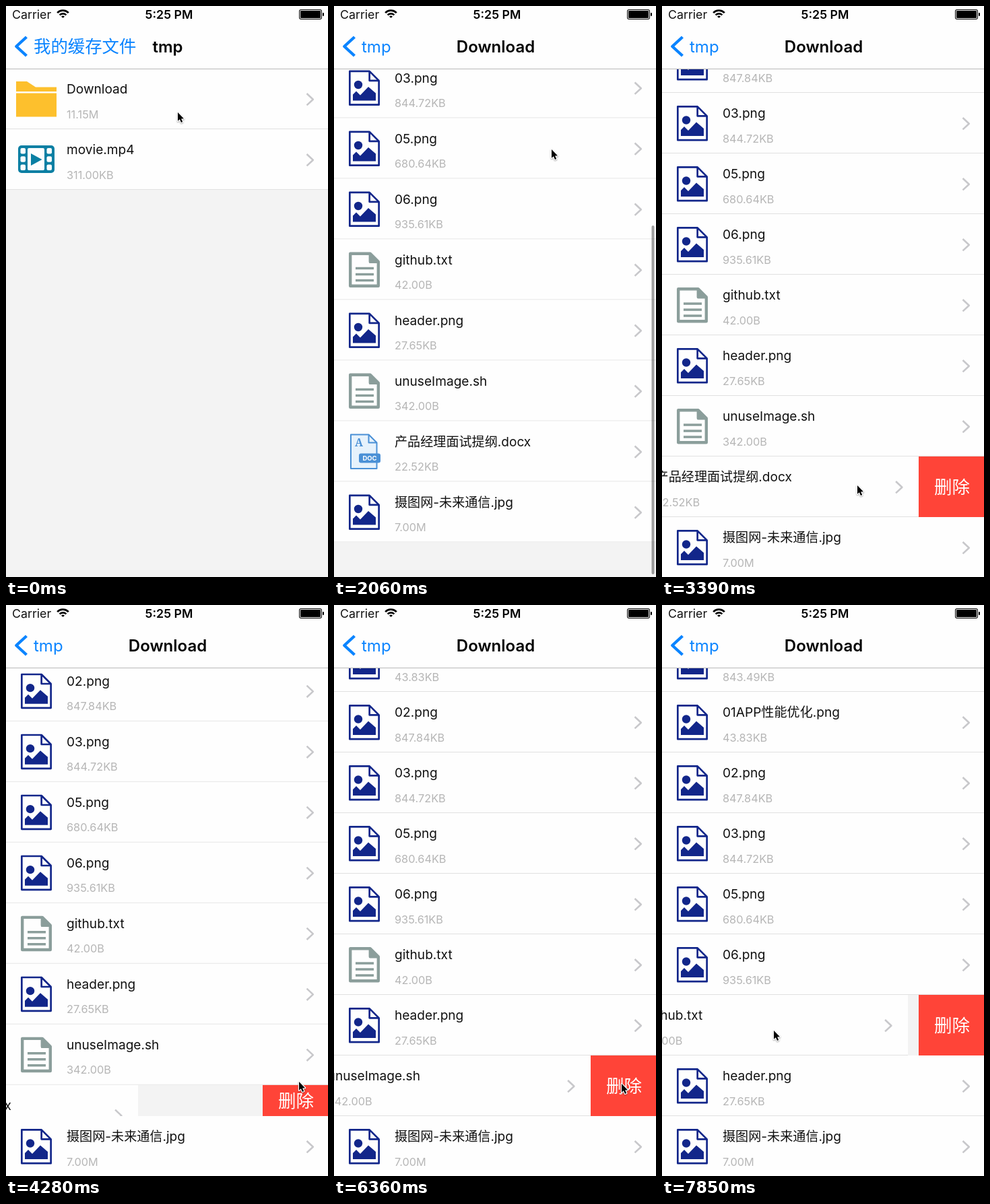
Recreate the animation shown at these times as an HTML page with a canvas. Size 478 by 848 pixels, loop 8000 ms.

```html
<!DOCTYPE html>
<html lang="zh-CN">
<head>
<meta charset="utf-8">
<title>File browser</title>
<style>
html, body { margin: 0; width: 100%; height: 100%; overflow: hidden; background: #f3f3f3; }
canvas { display: block; }
</style>
</head>
<body>
<canvas id="stage" width="478" height="848"></canvas>
<script>
const ctx = document.getElementById('stage').getContext('2d');
const W = 478, H = 848, TOP = 93, ROW = 90, VIEW = 756;
const LOOP = 8000, STEP = 148, LEAD = 16;
const FONT = 'Inter, "Noto Sans CJK SC", "Noto Sans CJK JP", sans-serif';
const BLUE = '#0a84ff', NAVY = '#12268a', PAPER = '#fefefe', GROUND = '#f3f3f3', RED = '#ff4438';
const OPEN = 97, PULL = 113, DRAG = 52.5;

const home = [
  { icon: folder, name: 'Download', size: '11.15M' },
  { icon: movie, name: 'movie.mp4', size: '311.00KB' }
];
// swipe: when the row starts to open; cut: when it is deleted.
const files = [
  { icon: image, name: '01.png', size: '843.49KB' },
  { icon: image, name: '01APP性能优化.png', size: '43.83KB' },
  { icon: image, name: '02.png', size: '847.84KB' },
  { icon: image, name: '03.png', size: '844.72KB' },
  { icon: image, name: '05.png', size: '680.64KB' },
  { icon: image, name: '06.png', size: '935.61KB' },
  { icon: note, name: 'github.txt', size: '42.00B', swipe: 7250 },
  { icon: image, name: 'header.png', size: '27.65KB' },
  { icon: note, name: 'unuseImage.sh', size: '342.00B', swipe: 5680, cut: 6510 },
  { icon: doc, name: '产品经理面试提纲.docx', size: '22.52KB', swipe: 2690, cut: 4129 },
  { icon: image, name: '摄图网-未来通信.jpg', size: '7.00M' }
];

// Where the pointer comes to rest: arrival time and place.
const stops = [
  [0, 255, 158], [600, 258, 147], [1450, 306, 540], [2056, 323, 213], [2648, 406, 693],
  [3260, 290, 712], [3980, 435, 708], [4900, 434, 791], [5680, 420, 716],
  [6120, 312, 716], [6348, 427, 711], [7250, 279, 628], [7828, 166, 632]
];

const clamp = v => Math.min(1, Math.max(0, v));
const ease = v => clamp(v) ** 2 * (3 - 2 * clamp(v));

function pointer(t) {
  let [last, x, y] = stops[0];
  for (const [end, px, py] of stops) {
    const k = ease(1 - (end - t) / Math.min(450, end - last || 1));
    x += (px - x) * k;
    y += (py - y) * k;
    last = end;
  }
  return [x, y];
}

// Drag past the end, then spring back.
function scrollAt(t, end) {
  if (t < 2150) return (end + DRAG) * ease((t - 1600) / 456);
  return end + (t < 2640 ? DRAG * Math.exp((2150 - t) / 80) : 0);
}

function swiped(u) {
  if (u < 580) return PULL * ease(u / 570);
  return OPEN + (PULL - OPEN) * clamp(1 - (u - 580) / 80);
}

// Critically damped push of the next screen.
function pushed(t) {
  const u = 16 * Math.max(0, t - 250) / 1000;
  return 1 - (1 + u) * Math.exp(-u);
}

function rect(color, x, y, w, h, r = 0) {
  ctx.fillStyle = color;
  ctx.beginPath();
  ctx.roundRect(x, y, w, h, r);
  ctx.fill();
}

function draw(points, { fill, stroke, width = 2.6, close = !!fill }) {
  ctx.lineJoin = 'round';
  ctx.beginPath();
  points.forEach(([x, y]) => ctx.lineTo(x, y));
  if (close) ctx.closePath();
  if (fill) {
    ctx.fillStyle = fill;
    ctx.fill();
  }
  if (stroke) {
    ctx.strokeStyle = stroke;
    ctx.lineWidth = width;
    ctx.stroke();
  }
}

// An angle bracket with its tip at x, y.
function bracket(x, y, dx, dy, stroke, width) {
  draw([[x + dx, y - dy], [x, y], [x + dx, y + dy]], { stroke, width });
}

function text(str, x, y, size, color, weight = 400, align = 'left') {
  ctx.font = `${weight} ${size}px ${FONT}`;
  ctx.fillStyle = color;
  ctx.textAlign = align;
  ctx.fillText(str, x, y);
}

function at(x, y, paint, alpha = 1) {
  ctx.save();
  ctx.globalAlpha *= alpha;
  ctx.translate(x, y);
  paint();
  ctx.restore();
}

function folder() {
  const gold = '#fdc02d';
  draw([[15, 19], [31, 19], [44, 27.5], [75, 27.5], [75, 34], [15, 34]], { fill: gold });
  rect(gold, 15, 36.5, 60, 35);
}

function movie() {
  const teal = '#0a7fa3';
  rect(teal, 18, 24, 54, 41, 5);
  rect(PAPER, 32, 28, 25, 33, 2);
  for (const x of [21.5, 60.5])
    for (let i = 0; i < 3; i++) rect(PAPER, x, 28 + i * 12.2, 7.5, 8.5, 2);
  draw([[37, 36], [53.5, 45], [37, 54]], { fill: teal });
}

// A page with a folded corner, outlined inside its box.
function page(stroke, width, left, right, fold, fill) {
  const x = left + width / 2, r = right - width / 2, y = 19 + width / 2, b = 71.5 - width / 2;
  draw([[x, y], [r - fold, y], [r, y + fold], [r, b], [x, b]], { stroke, width, fill, close: true });
  draw([[r - fold, y], [r - fold, y + fold], [r, y + fold]], { stroke, width });
}

function image() {
  page(NAVY, 2.7, 22, 68, 14);
  rect(NAVY, 29.8, 34.3, 12.4, 12.4, 6.2);
  draw([[28, 64], [28, 55], [33, 50], [39, 56], [51, 43.5], [62, 53], [62, 64]], { fill: NAVY });
}

function note() {
  const gray = '#8b9e9b';
  page(gray, 4.4, 22, 68, 12);
  draw([[52, 20], [67, 35], [52, 35]], { fill: gray });
  for (let i = 0; i < 3; i++) rect(gray, 32, 41.3 + i * 9, 27, 3.5);
}

function doc() {
  const blue = '#4a90d6';
  page(blue, 2, 24, 64.5, 12, '#e6f2fc');
  ctx.font = 'bold 16px "Noto Serif", "Liberation Serif", serif';
  ctx.textAlign = 'center';
  ctx.fillStyle = blue;
  ctx.fillText('A', 37, 37);
  rect(blue, 37, 48, 32, 14, 3);
  text('DOC', 53, 58.5, 9.5, '#fff', 700, 'center');
}

function cell({ icon, name, size }) {
  icon();
  text(name, 90, 37, 19.1, '#111');
  text(size, 90, 73.5, 16.3, '#b6b6b6');
  bracket(455.8, 45.7, -9.3, 8.7, '#c8c8cb', 2.6);
}

function rowState(file, t) {
  const cut = file.cut ? ease((t - file.cut) / 300) : 0;
  const open = file.swipe ? swiped(t - file.swipe) : 0;
  return { file, x: Math.round(open + cut * (W - OPEN)), h: ROW * (1 - cut) };
}

function drawRow({ file, x, h }, y, fill = PAPER) {
  if (h < 1 || y > H || y + h < TOP) return;
  ctx.save();
  ctx.beginPath();
  ctx.rect(0, y, W, h);
  ctx.clip();
  if (x) {
    rect(GROUND, 0, y, W, h);
    rect(RED, W - OPEN, y, OPEN, h);
    text('删除', 430.5, y + h / 2 + 10, 26.5, '#fff', 400, 'center');
  }
  rect(fill, -x, y, W, ROW);
  rect('#e1e1e1', -x, y + ROW - 1, W, 1);
  at(x ? -x - 2.4 : 0, y, () => cell(file));
  ctx.restore();
}

function homeList(t) {
  rect(GROUND, 0, TOP, W, H - TOP);
  home.forEach((file, i) => {
    const lit = i === 0 && t > 120 && t < 300;
    drawRow(rowState(file, t), TOP + i * ROW, lit ? '#d9d9d9' : PAPER);
  });
}

function scrollBar(t, scroll, total) {
  const alpha = .38 * clamp((t - 1500) / 100) * clamp((2800 - t) / 300);
  const space = H - TOP - 8, size = space * VIEW / total, end = total - VIEW;
  const over = Math.max(0, scroll - end);
  const y = TOP + 4 + (space - size) * Math.min(1, scroll / end) + over;
  rect(`rgba(0,0,0,${alpha})`, 471.5, y, 4, size - over, 2);
}

function fileList(t) {
  rect(GROUND, 0, TOP, W, H - TOP);
  const rows = files.map(file => rowState(file, t));
  const total = rows.reduce((sum, row) => sum + row.h, 0);
  const scroll = scrollAt(t, total - VIEW);
  let y = TOP - scroll;
  for (const row of rows) {
    drawRow(row, y);
    y += row.h;
  }
  scrollBar(t, scroll, total);
}

function statusBar() {
  text('Carrier', 9, 19, 17.8, '#111');
  text('5:25 PM', 242, 19, 17.8, '#000', 600, 'center');
  ctx.strokeStyle = '#000';
  ctx.lineWidth = 2.7;
  for (let r = 2; r < 13; r += 4.7) {
    ctx.beginPath();
    ctx.arc(84.5, 18, r, -Math.PI * .76, -Math.PI * .24);
    ctx.stroke();
  }
  rect('#000', 435, 5, 34, 15, 3);
  rect(PAPER, 436, 6, 32, 13, 2);
  rect('#000', 437, 7, 30, 11, 1);
  rect('#000', 470, 10, 2, 5, 1);
}

function navBar(p) {
  rect(PAPER, 0, 0, W, TOP);
  rect('#b9b9b9', 0, TOP, W, 1);
  statusBar();
  bracket(15.3, 60, 15.2, 14, BLUE, 4.4);
  const q = 1 - p;
  at(-150 * p, 0, () => text('我的缓存文件', 41, 69, 25.4, BLUE), q * q);
  at(-177 * p, 0, () => text('tmp', 240, 69, 24, '#000', 600, 'center'), q);
  at(177 * q, 0, () => text('tmp', 41, 69, 24, BLUE), p);
  at(200 * q, 0, () => text('Download', 240, 69, 24, '#000', 600, 'center'), p);
}

function cursor([x, y]) {
  const arrow = [[0, 0], [0, 12.8], [2.9, 10.2], [5, 15], [7.2, 14.1], [5.1, 9.4], [9, 9.2]];
  at(x, y, () => {
    ctx.shadowColor = 'rgba(0,0,0,.35)';
    ctx.shadowBlur = 2;
    ctx.shadowOffsetY = 1;
    draw(arrow, { stroke: '#fff', width: 2.4, close: true });
    ctx.shadowColor = 'transparent';
    draw(arrow, { fill: '#000' });
  });
}

function screens(t, p) {
  const x = Math.round(W * (1 - p));
  if (x > 0) {
    at(-Math.round(W * .3 * p), 0, () => homeList(t));
    rect(`rgba(0,0,0,${.1 * p})`, 0, TOP, x, H - TOP);
    const shade = ctx.createLinearGradient(x - 8, 0, x, 0);
    shade.addColorStop(0, 'rgba(0,0,0,0)');
    shade.addColorStop(1, `rgba(0,0,0,${.12 * clamp(p * 9)})`);
    rect(shade, x - 8, TOP, 8, H - TOP);
  }
  if (x < W) at(x, 0, () => fileList(t));
}

// Time is held between coarse steps.
function loop(now) {
  const step = Math.min(53, Math.floor((now % LOOP + LEAD) / STEP));
  const t = Math.max(0, step * STEP - LEAD), p = pushed(t);
  rect(GROUND, 0, 0, W, H);
  screens(t, p);
  navBar(p);
  cursor(pointer(t));
  requestAnimationFrame(loop);
}
requestAnimationFrame(loop);
</script>
</body>
</html>
```
